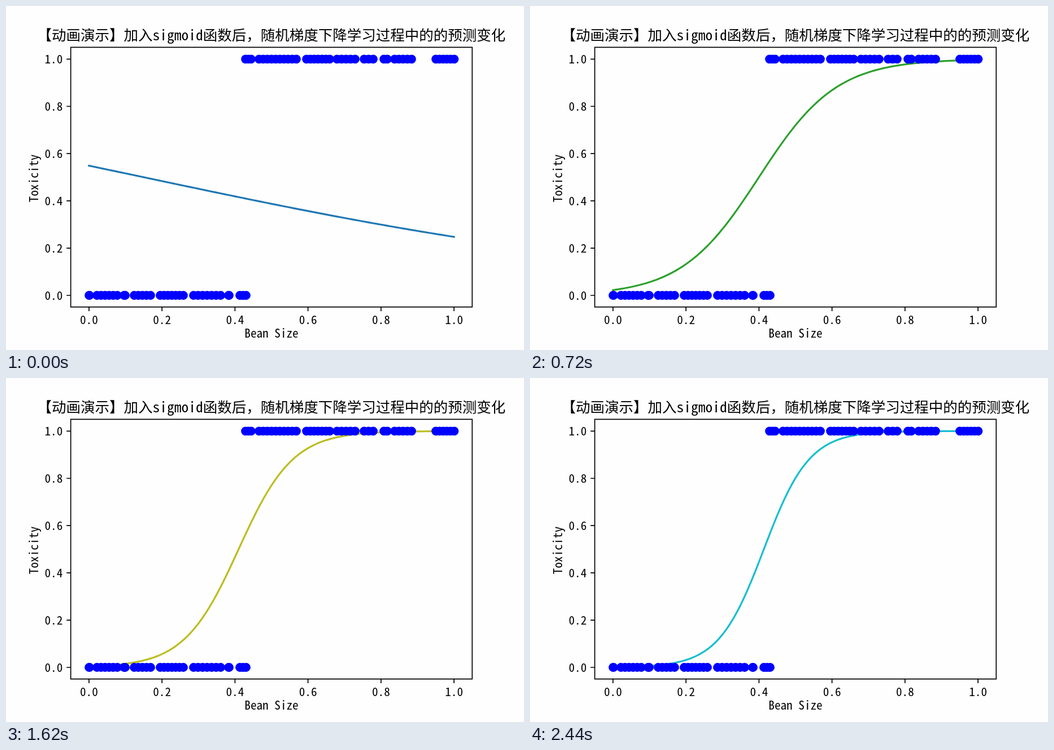
An HTML page for the animation above (2.46 s loop, 917 px wide and 611 px high).

```html
<!DOCTYPE html>
<html lang="zh-CN">
<meta charset="utf-8">
<style>
  html, body { margin: 0; width: 100%; height: 100%; overflow: hidden; background: #fefefe; }
  svg { display: block; }
  text { font: 21.2px "Noto Sans Mono CJK SC", "Noto Sans CJK SC", "Noto Sans CJK", monospace; text-anchor: middle; }
  #title { font-size: 25.5px; }
  .end { text-anchor: end; }
  #axes { fill: none; stroke: #000; stroke-width: 1.7; }
  #curve { fill: none; stroke-width: 3.2; stroke-linecap: square; stroke-linejoin: round; }
  #dots { fill: none; stroke: #00f; stroke-width: 15.8; stroke-linecap: round; }
</style>
<svg width="917" height="611" viewBox="0 0 917 611">
  <path id="curve"/>
  <path id="dots"/>
  <path id="axes"/>
  <g id="labels"></g>
  <text id="title" x="470" y="60.5">【动画演示】加入sigmoid函数后，随机梯度下降学习过程中的的预测变化</text>
  <text x="470" y="589">Bean Size</text>
  <text transform="translate(57 306) rotate(-90)">Toxicity</text>
</svg>
<script>
const $ = id => document.getElementById(id);
const px = x => 146.9 + 646.2 * x;
const py = y => 514 - 419.7 * y;

// Beans lie in runs "from-to" (pixels), spread evenly about 8 px apart
function beans(runs, y) {
  let d = '';
  for (const run of runs.split(' ')) {
    const [from, to] = run.split('-').map(Number);
    const gaps = Math.ceil((to - from) / 8);
    for (let i = 0; i <= gaps; i++) d += `M${from + (to - from) * i / gaps} ${py(y)}h0`;
  }
  return d;
}
$('dots').setAttribute('d',
  beans('147-148 161-197 209-211 227-256 273-314 332-380 394-395 414-425', 0) +
  beans('424-434 448-514 532-573 586-618 634-650 669-675 688-718 761-793.5', 1));

let axes = 'M114.6 73.3H825.3V534.6H114.6Z', labels = '';
for (let i = 0; i <= 5; i++) {
  const v = i / 5, s = v.toFixed(1);
  axes += `M${px(v)} 534.6v7.4M114.6 ${py(v)}h-7.4`;
  labels += `<text x="${px(v)}" y="565">${s}</text><text class="end" x="100.3" y="${py(v) + 8}">${s}</text>`;
}
$('axes').setAttribute('d', axes);
$('labels').innerHTML = labels;

const colors = ['#1f77b4', '#ff7f0e', '#2ca02c', '#d62728', '#9467bd',
  '#8c564b', '#e377c2', '#7f7f7f', '#bcbd22', '#17becf'];

// Weight and bias after n steps: learning slows down while the midpoint settles
function params(n) {
  if (n === 0) return [-1.307, 0.196];
  const w = 6.75 * n ** 0.25 - 5.2;
  const mid = 0.4243 - 0.71 * w ** -1.5;
  return [w, -w * mid];
}

// One step every 20 ms, with a rest at the start and after step 47
function stepAt(t) {
  if (t < 300) return 0;
  return t < 1420 ? Math.min(47, 1 + Math.floor((t - 300) / 20)) : 48 + Math.floor((t - 1420) / 20);
}

function draw() {
  const n = stepAt(performance.now() % 2460);
  const [w, b] = params(n);
  const points = [];
  for (let x = 0; x <= 100; x++) {
    const y = 1 / (1 + Math.exp(-w * x / 100 - b));
    points.push(`${px(x / 100).toFixed(2)} ${py(y).toFixed(2)}`);
  }
  $('curve').setAttribute('d', 'M' + points.join('L'));
  $('curve').setAttribute('stroke', colors[n % 10]);
  requestAnimationFrame(draw);
}
draw();
</script>
</html>
```
